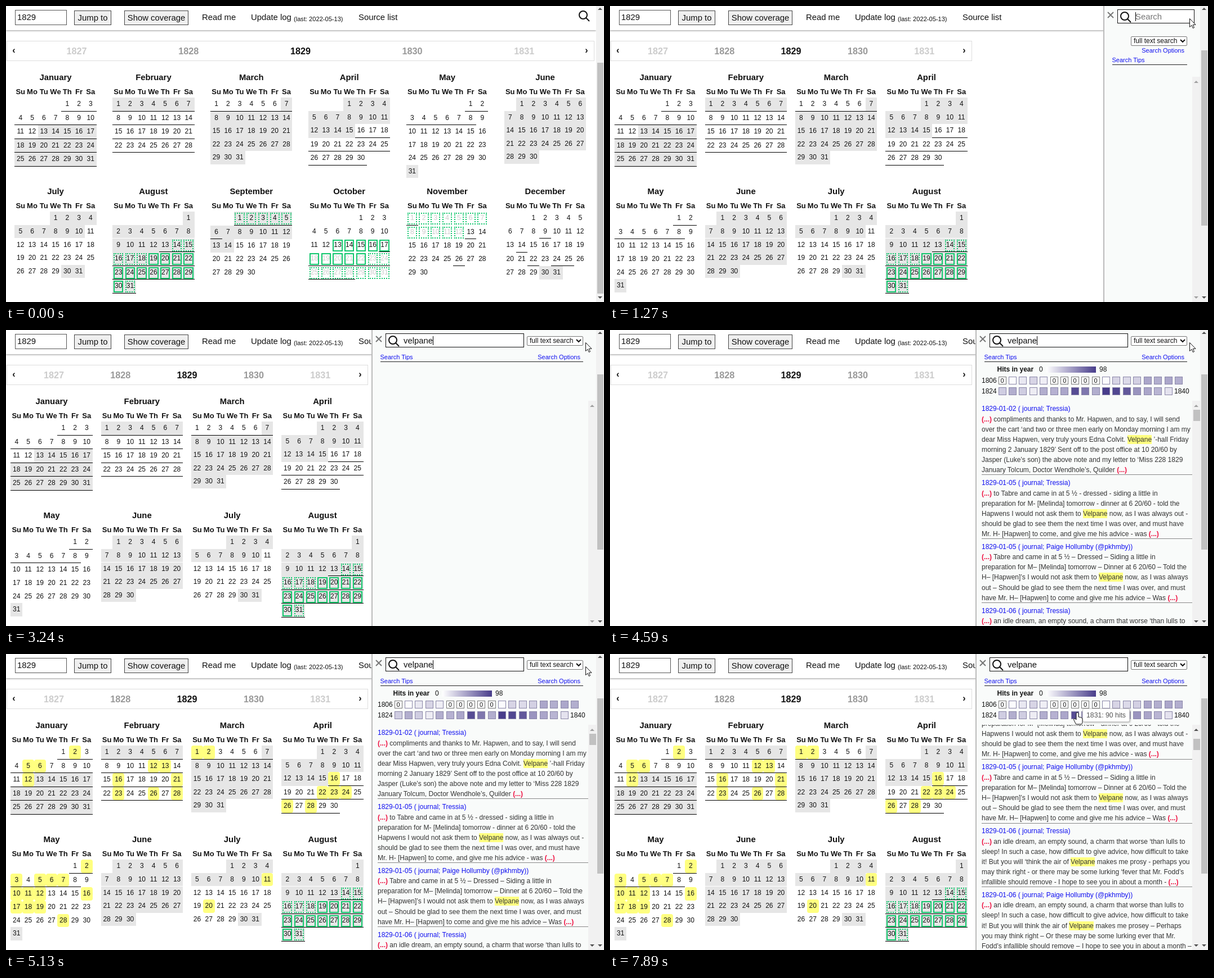
Recreate the animation shown at these times as an HTML page. Size 1062x527 px, loop 8 s.

```html
<!DOCTYPE html>
<html lang="en">
<head>
<meta charset="utf-8">
<title>Diary calendar search</title>
<style>
html, body { margin: 0; width: 100%; height: 100%; overflow: hidden; background: #fff; }
body { position: relative; font: 12px/20px "Liberation Sans", Arial, sans-serif; color: #111; }
div, svg { position: absolute; box-sizing: border-box; white-space: pre; }
svg { overflow: visible; }
.cell { text-align: center; line-height: 23px; }
.gray { background: #e6e6e6; }
.line { border-bottom: 1px solid #000; }
.faint { color: #ccc; }
.hit { background: #ffff80; border-radius: 4px; display: none; }
.found .hit { display: block; }
.solid { border: 2px solid #12c66d; }
.dotted { border: 2px dotted #12c66d; }
mark { background: #ffff80; color: inherit; padding: 1px 0; }
.cut { color: #ee1040; }
.link { color: #1010f0; }
.caret { display: inline-block; width: 1px; height: 16px; margin-right: -1px; background: #000; vertical-align: -3px; }
</style>
</head>
<body>
<script>
const put = (parent, x, y, w, h, css = '', html = '') => {
  const d = document.createElement('div');
  d.style.cssText = `left:${x}px;top:${y}px;width:${w}px;height:${h}px;${css}`;
  d.innerHTML = html;
  parent.append(d);
  return d;
};
// y is the middle of the line
const text = (parent, x, y, html, size = 12, css = '') =>
  put(parent, x, y - 10, 'auto', 20, `width:auto;font-size:${size}px;${css}`, html);
const mid = (parent, x, y, html, size, css = '') =>
  put(parent, x - 60, y - 10, 120, 20, `text-align:center;font-size:${size}px;${css}`, html);
const layer = (parent, css = '') => put(parent, 0, 0, 1062, 527, css);
const show = (el, on) => el.style.display = on ? '' : 'none';
const clamp = v => Math.max(0, Math.min(1, v));

const SIZE = 14.85, CELL = 20.75, ROW = 23.6;

// ---- Calendar ----
const names = 'January February March April May June July August September October November December'.split(' ');
const marks = [
  { gray: '13-31', line: '1-31', hit: '2 5-6 12' },
  { gray: '1-7', line: '1-28', hit: '12-13 16 21 23 26 28' },
  { gray: '7-31', line: '1-7', hit: '1-2' },
  { gray: '1-15', line: '16-30', hit: '16 22-24 26 28' },
  { gray: '31', line: '1-8', hit: '2-3 5-7 10-12 16-19 28' },
  { gray: '1-30' },
  { gray: '1-10 30-31', hit: '11 20' },
  { gray: '1-31', line: '13-31', solid: '19-30', dotted: '14-18 31' },
  { gray: '1-14', line: '1-6', dotted: '1-5' },
  { line: '17-28', solid: '13-22', dotted: '23-31', faint: '18-31' },
  { line: '1 13 26', dotted: '1-12', faint: '1-12' },
  { gray: '30-31', line: '9 14 22 24-25' }
];
const within = (list = '', day) => list.split(' ').some(r => {
  const [a, b = a] = r.split('-');
  return day >= +a && day <= +b;
});

function month(parent, m, cx, y) {
  const info = marks[m], left = cx - 3.5 * CELL;
  const first = new Date(1829, m, 1).getDay(), last = new Date(1829, m + 1, 0).getDate();
  mid(parent, cx, y, names[m], SIZE, 'font-weight:bold');
  'Su Mo Tu We Th Fr Sa'.split(' ').forEach((d, i) =>
    mid(parent, left + (i + .5) * CELL, y + 26, d, 13, 'font-weight:bold'));
  let rowY = y + 36;
  for (let start = 1 - first; start <= last; start += 7) {
    const week = [...Array(7).keys()].map(i => start + i);
    const lined = week.some(d => d > 0 && d <= last && within(info.line, d));
    const h = lined ? 24.5 : ROW;
    week.forEach((d, i) => {
      if (d < 1 || d > last) return;
      const cell = put(parent, left + i * CELL, rowY, CELL, h);
      cell.className = 'cell ' + ['gray', 'line', 'faint'].filter(k => within(info[k], d)).join(' ');
      if (within(info.hit, d)) put(cell, 0, 0, CELL, ROW).className = 'hit';
      for (const k of ['solid', 'dotted'])
        if (within(info[k], d)) put(cell, 1.7, 2, 17.3, 21).className = k;
      put(cell, 0, 0, CELL, h, '', d);
    });
    rowY += h;
  }
}

function calendar(cols, count, x, step, width, yearX, yearStep) {
  const page = layer(document.body), months = layer(page);
  put(page, 1, 62, width, 36, 'border:1px solid #ddd');
  ['#ccc', '#999', '#111', '#999', '#ccc'].forEach((c, i) =>
    mid(page, yearX + i * yearStep, 79.5, 1827 + i, 16.2, `font-weight:bold;color:${c}`));
  mid(page, 14, 79, '‹', 16, 'font-weight:bold');
  mid(page, width - 13, 79, '›', 16, 'font-weight:bold');
  for (let m = 0; m < count; m++)
    month(months, m, x + m % cols * step, 127 + Math.floor(m / cols) * 203.3);
  return { page, months };
}
const wide = calendar(6, 12, 88, 173.9, 1044, 125.5, 198.7);
const narrow = calendar(4, 8, 81, 160.35, 642, 85, 118.3);

// ---- Top bar ----
const glass = (parent, x, y) => put(parent, x, y, 24, 24, '',
  '<svg width="24" height="24" fill="none" stroke="#111" stroke-width="2"><circle cx="9" cy="9" r="7"/><path d="M14 14L20 20"/></svg>');
const bar = put(document.body, 0, 0, 1048, 43, 'background:#fff;box-shadow:0 1px 3px #999');
const button = (x, w, label) =>
  put(bar, x, 7.5, w, 26, `background:#efefef;border:1px solid #444;text-align:center;font-size:${SIZE}px;line-height:24px`, label);
put(bar, 16, 7, 92, 27, 'border:1px solid #555;background:#fff');
text(bar, 20, 20, '1829', SIZE);
button(121, 66, 'Jump to');
button(210, 114, 'Show coverage');
text(bar, 348, 20, 'Read me', SIZE);
text(bar, 435, 20, 'Update log', SIZE);
text(bar, 511, 23, '(last: 2022-05-13)', 11.1);
text(bar, 626, 20, 'Source list', SIZE);
glass(bar, 1016, 7);

// ---- Scroll bars ----
const arrow = (parent, x, y, up) => put(parent, x - 4, y - 2, 8, 4,
  `background:#505050;clip-path:polygon(${up ? '0 100%,50% 0,100% 100%' : '0 0,50% 100%,100% 0'})`);
const track = put(document.body, 1048, 0, 14, 527, 'background:#f1f1f1');
const thumb = put(track, 2, 101, 11, 411, 'background:#c1c1c1');
arrow(track, 7, 5, true);
arrow(track, 7, 519);

// ---- Search panel ----
const panel = put(document.body, 649, 0, 399, 527, 'background:#f9fbfa;overflow:hidden');
put(panel, 0, 0, 2, 527, 'background:#bbb');
put(panel, 7.5, 11, 10, 10, '',
  '<svg width="10" height="10" stroke="#777" stroke-width="2"><path d="M0 0L10 10M10 0L0 10"/></svg>');
const input = put(panel, 24.5, 6, 246, 25, 'border:1px solid #111;background:#fff');
glass(input, 3, 2);
const query = text(input, 31.5, 11.5, '', SIZE);
const select = put(panel, 0, 11, 100, 17, 'left:auto;right:23px;border:1px solid #777;border-radius:2px;background:#fff;line-height:15px;padding-left:4px',
  'full text search<svg style="right:3px;top:5px" width="8" height="5" fill="none" stroke="#111" stroke-width="2"><path d="M0 0L4 4 8 0"/></svg>');
const options = text(panel, 0, 48, 'Search Options', 11, 'left:auto;right:28px;color:#1010f0');
const tips = text(panel, 15.5, 48, 'Search Tips', 11, 'color:#1010f0');
const rule = put(panel, 16, 56, 0, 1, 'width:auto;right:23px;background:#222');
const side = put(panel, 0, 126, 14, 401, 'left:auto;right:0;background:#f1f1f1');
const upArrow = arrow(side, 7, 9, true), downArrow = arrow(side, 7, 393);
const sideThumb = put(side, 2, 16, 12, 20, 'background:#c1c1c1');

const found = put(panel, 0, 0, 385, 527);
text(found, 38.5, 70, '<b>Hits in year</b>');
text(found, 113, 70, '0');
put(found, 126, 65, 88, 11, 'background:linear-gradient(90deg,#fff,#483d8b)');
text(found, 220, 70, '98');
const shares = [
  [0, 2, 12, 22, 9, 0, 0, 0, 0, 0, 2, 22, 19, 24, 46, 42, 46, 42],
  [26, 42, 26, 10, 42, 40, 46, 92, 70, 42, 100, 95, 86, 55, 46, 38, 15]
];
shares.forEach((row, r) => {
  const y = 90 + r * 18.5;
  text(found, 11, y, 1806 + r * 18);
  row.forEach((v, i) => put(found, 40.5 + i * 18.45, y - 7, 14, 14,
    `border:1px solid ${v ? '#8a86a8' : '#777'};background:color-mix(in srgb,#483d8b ${v}%,#fff);text-align:center;font-size:11px;line-height:12px`,
    v ? '' : '0'));
});
text(found, 353, 108.5, '1840');

const entries = [
  ['1829-01-02 ( journal; Tressia)', `(...) compliments and thanks to Mr. Hapwen, and to say, I will send
over the cart ‘and two or three men early on Monday morning I am my
dear Miss Hapwen, very truly yours Edna Colvit. Velpane ’-hall Friday
morning 2 January 1829’ Sent off to the post office at 10 20/60 by
Jasper (Luke’s son) the above note and my letter to ‘Miss 228 1829
January Tolcum, Doctor Wendhole’s, Quilder (...)`],
  ['1829-01-05 ( journal; Tressia)', `(...) to Tabre and came in at 5 ½ - dressed - siding a little in
preparation for M- [Melinda] tomorrow - dinner at 6 20/60 - told the
Hapwens I would not ask them to Velpane now, as I was always out -
should be glad to see them the next time I was over, and must have
Mr. H- [Hapwen] to come, and give me his advice - was (...)`],
  ['1829-01-05 ( journal; Paige Hollumby (@pkhmby))', `(...) Tabre and came in at 5 ½ – Dressed – Siding a little in
preparation for M– [Melinda] tomorrow – Dinner at 6 20/60 – Told the
H– [Hapwen]’s I would not ask them to Velpane now, as I was always
out – Should be glad to see them the next time I was over, and must
have Mr. H– [Hapwen] to come and give me his advice – Was (...)`],
  ['1829-01-06 ( journal; Tressia)', `(...) an idle dream, an empty sound, a charm that worse ‘than lulls to
sleep! In such a case, how difficult to give advice, how difficult to take
it! But you will ‘think the air of Velpane makes me prosy - perhaps you
may think right - or there may be some lurking ‘fever that Mr. Fodd’s
infallible should remove - I hope to see you in about a month - (...)`],
  ['1829-01-06 ( journal; Paige Hollumby (@pkhmby))', `(...) an idle dream, an empty sound, a charm that worse than lulls to
sleep! In such a case, how difficult to give advice, how difficult to take
it! But you will think the air of Velpane makes me prosey – Perhaps
you may think right – Or these may be some lurking ever that Mr.
Fodd’s infallible should remove – I hope to see you in about a month –`]
];
const view = put(found, 2, 126, 383, 401, 'overflow:hidden');
const list = put(view, 0, 0, 383, 700);
let itemY = .6;
const items = entries.map(([head, body]) => {
  const from = itemY, h = body.split('\n').length * 18.1 + 23.3;
  const el = put(list, 9, from, 374, h, 'border-bottom:1px solid #888');
  text(el, 0, 13.5, head).className = 'link';
  put(el, 0, 23, 374, h - 24, 'line-height:18.1px;color:#333', body
    .replaceAll('Velpane', '<mark>Velpane</mark>')
    .replaceAll('(...)', '<b class="cut">(...)</b>'));
  itemY += h;
  return { el, from, to: itemY };
});

const tooltip = put(document.body, 839, 97, 84, 24,
  'background:#fff;border:1px solid #ccc;border-radius:3px;box-shadow:1px 1px 3px #aaa;color:#555;font-size:12.2px;line-height:22px;text-align:center', '1831: 90 hits');

// ---- Pointer ----
const pointer = d => put(document.body, 0, 0, 1, 1, '',
  `<svg width="1" height="1" fill="#fff" stroke="#111" stroke-linejoin="round"><path d="${d}"/></svg>`);
const arrowTip = pointer('M.5 .5V15.5L4 12.3 6.3 17.5 8.5 16.5 6.2 11.3H11Z');
const hand = pointer('M-2 2a2 2 0 0 1 4 0V8l4.5 1q2.5 .8 2.5 3v5q0 2-1.5 4H-2.5l-3.5-7q-1-2.5 .5-3 1.5-.4 3.500 2Z');
const path = [
  [90, 1050, 90], [300, 1029, 22], [5300, 1029, 22], [5320, 1029, 21], [5490, 1022, 28],
  [6220, 762, 204], [6400, 764, 237], [7210, 764, 237], [7750, 830, 104], [8000, 830, 104]
];
function place(t) {
  const i = Math.max(1, path.findIndex(p => p[0] > t));
  const [a, b] = [path[i - 1], path[i]], k = clamp((t - a[0]) / (b[0] - a[0]));
  return [1, 2].map(n => Math.round(a[n] + (b[n] - a[n]) * k));
}

const keyTimes = [2420, 2580, 2650, 2880, 3030, 3180, 3240];
const ease = k => .5 - Math.cos(Math.PI * clamp(k)) / 2;

function render(t) {
  const open = t >= 990, done = t >= 4590;
  show(wide.page, !open);
  show(narrow.page, open);
  narrow.months.className = done ? 'found' : '';
  narrow.months.style.opacity = done ? ease((t - 4690) / 430) : 1;
  thumb.style.top = (open ? 79 : 101) + 'px';
  thumb.style.height = (open ? 312 : 411) + 'px';

  const w = Math.round(399 * clamp((t - 1000) / 630));
  const wrap = w < 385, stack = wrap && w < 215;
  show(panel, w > 0);
  panel.style.left = 1048 - w + 'px';
  panel.style.width = w + 'px';
  input.style.width = Math.max(0, Math.min(246, w - 35)) + 'px';
  select.style.top = (wrap ? 54 : 11) + 'px';
  options.style.top = (wrap ? 69 : 38) + 'px';
  tips.style.top = (stack ? 86 : wrap ? 69 : 38) + 'px';
  rule.style.top = (stack ? 104 : wrap ? 87 : 56) + 'px';

  const typed = 'velpane'.slice(0, keyTimes.filter(k => t >= k).length);
  const caret = t < 1590 || t >= 2120 && t < 5900 || t >= 6430 && t < 6960;
  query.innerHTML = typed + (caret ? '<i class="caret"></i>' : '') +
    (typed ? '' : '<span style="color:#757575">Search</span>');

  const scroll = t >= 6790 ? 184.5 : 92.4 * ease((t - 6310) / 250);
  show(found, done);
  show(sideThumb, done);
  list.style.top = -scroll + 'px';
  sideThumb.style.top = 16 + scroll / 20.5 + 'px';
  upArrow.style.opacity = scroll ? 1 : .5;
  downArrow.style.opacity = done ? 1 : .5;

  const [x, y] = place(t), pointing = t >= 250 && t < 990 || t >= 5560;
  show(arrowTip, t >= 90 && !pointing);
  show(hand, pointing);
  for (const p of [arrowTip, hand]) {
    p.style.left = x + 'px';
    p.style.top = y + 'px';
  }
  const at = y - 126 + scroll;
  for (const { el, from, to } of items)
    el.style.background = t > 5560 && y > 126 && at >= from && at < to ? '#f3f4f4' : '';
  show(tooltip, t >= 7890);
}

const began = performance.now();
(function tick() {
  render((performance.now() - began) % 8000);
  requestAnimationFrame(tick);
})();
</script>
</body>
</html>
```
